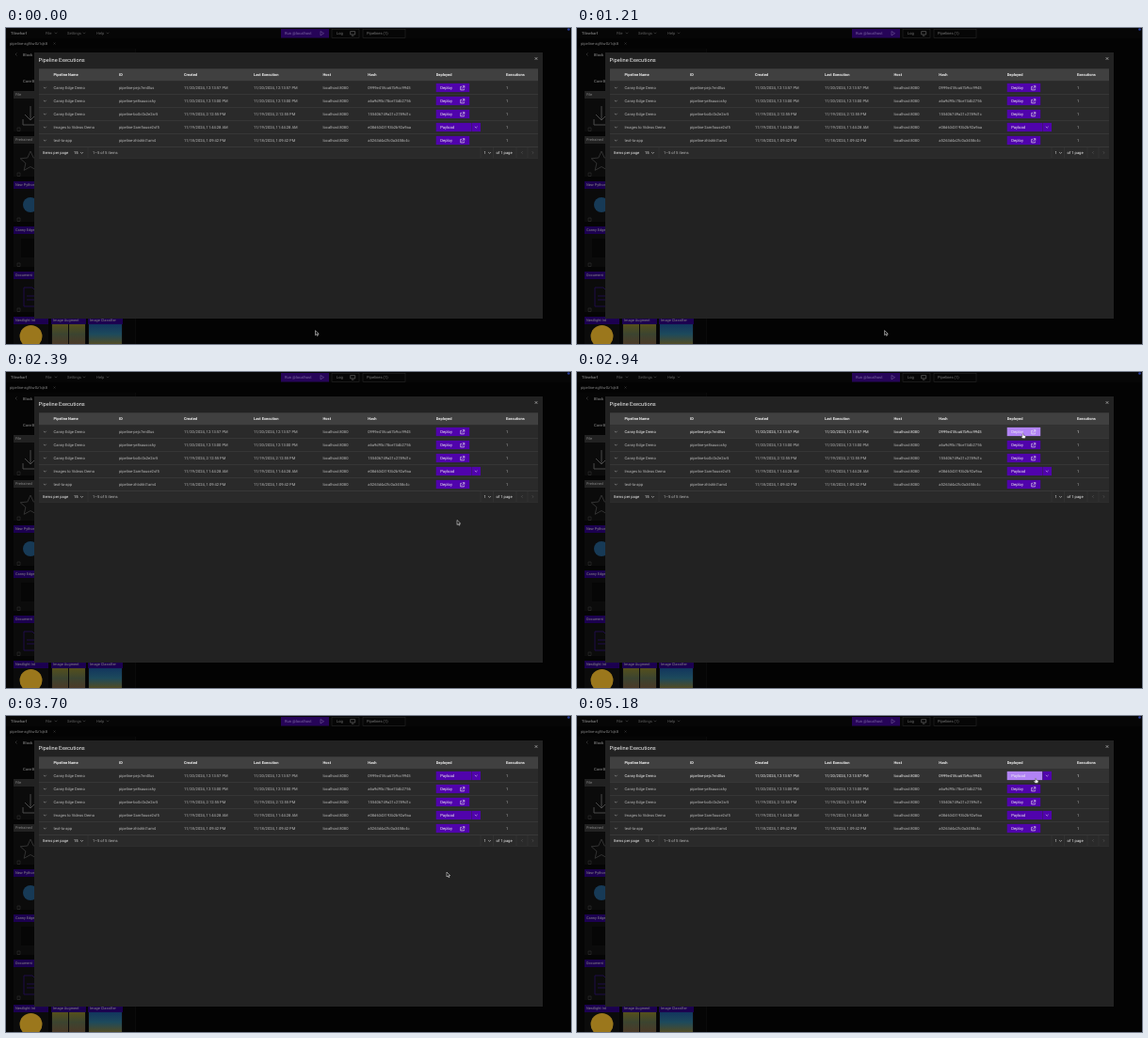
These frames come from a looping animation (600 by 336 pixels, 5210 ms). An HTML page:

```html
<!DOCTYPE html>
<html lang="en">
<head>
<meta charset="utf-8">
<title>Pipeline Executions</title>
<style>
html, body { margin: 0; width: 100%; height: 100%; overflow: hidden; background: #030303; }
svg { display: block; width: 600px; height: 336px; font: 4.1px Roboto, Inter, sans-serif; text-rendering: geometricPrecision; }
</style>
</head>
<body>
<svg id="stage" viewBox="0 0 600 336">
  <defs>
    <linearGradient id="sky" x2="0" y2="1">
      <stop stop-color="#12365e"/><stop offset=".5" stop-color="#1d4a5c"/><stop offset="1" stop-color="#514b25"/>
    </linearGradient>
    <linearGradient id="meadow" x2="0" y2="1">
      <stop stop-color="#55501c"/><stop offset=".5" stop-color="#3c4430"/><stop offset="1" stop-color="#4b3a28"/>
    </linearGradient>
  </defs>
</svg>
<script>
const stage = document.getElementById("stage");
const LOOP = 5210, DEPLOYED_AT = 3180, FADE = 110;
const WHITE = "#f0f0f0", DIM = "#b8b8b8";
const PURPLE = [80, 3, 172], LIGHT = [177, 131, 245];

function add(tag, attrs, parent = stage) {
  const node = document.createElementNS("http://www.w3.org/2000/svg", tag);
  for (const key in attrs) node.setAttribute(key, attrs[key]);
  return parent.appendChild(node);
}
const rect = (x, y, width, height, fill, parent) => add("rect", { x, y, width, height, fill }, parent);
const path = (d, stroke, width = 0.5, parent = stage) =>
  add("path", { d, stroke, "stroke-width": width, fill: "none" }, parent);
function text(x, y, content, fill = DIM, size = 4.1, weight = 400, parent = stage) {
  const node = add("text", { x, y, fill, "font-size": size, "font-weight": weight }, parent);
  node.textContent = content;
  return node;
}
const chevron = (x, y, color, parent) => path(`M${x - 1.4} ${y - 0.7}l1.4 1.4 1.4-1.4`, color, 0.5, parent);
const show = (node, on) => node.setAttribute("visibility", on ? "visible" : "hidden");

// Dimmed workspace behind the dialog
rect(0, 0, 600, 336, "#030303");
rect(0, 0, 600, 11, "#060606");
rect(0, 22, 137, 314, "#050505");
rect(137, 22, 0.6, 314, "#101010");
add("circle", { cx: 597.5, cy: 1.5, r: 1.3, fill: "#2b3fa0" });
text(5, 7, "Tilewharf", "#777", 4.1, 500);
[[42, "File"], [65, "Settings"], [96, "Help"]].forEach(([x, label], i) => {
  text(x, 7, label, "#606060");
  chevron(x + [11, 18, 12][i], 5.4, "#555");
});
rect(292, 1, 51, 9.5, "#260458");
text(296, 7.2, "Run @localhost", "#7d68a2");
path("M334 3.5v4.4l3.5-2.2z", "#7d68a2");
for (const [x, width] of [[346, 29], [379, 45]])
  add("rect", { x, y: 1.3, width, height: 9, fill: "none", stroke: "#2d2d2d", "stroke-width": 0.5 });
text(351, 7.2, "Log", "#777");
path("M365.7 3.7h5v3.2h-5zM367 8.2h2.4", "#888", 0.5);
text(383, 7.2, "Pipelines (1)", "#777");
text(4, 18.3, "pipeline-agf6w0z1qk8", "#808080");
path("M50.5 15.5l2 2m0-2l-2 2", "#555", 0.4);
path("M11.5 26.5l-1.5 1.5 1.5 1.5", "#666", 0.4);
text(18, 29.5, "Block", "#777", 4.1, 500);
text(18, 57.5, "Core B", "#777", 4.1, 500);

const blocks = [
  ["File", "#222"], ["Pretrained", "#222"], ["New Python", "#1c0050"],
  ["Canny Edge", "#1c0050"], ["Document", "#1c0050"], ["Nestlight Int", "#1c0050"]
];
function block(x, y, label, color) {
  rect(x, y, 37, 43, "#0b0b0b");
  rect(x, y, 37, 8, color);
  text(x + 2, y + 5.4, label, "#858585", 3.9);
  path(`M${x + 4} ${y + 39}h3v3.5h-3z`, "#444", 0.4);
}
blocks.forEach(([label, color], i) => block(8, 67 + i * 48, label, color));
block(48, 307, "Image Augment", "#1c0050");
block(87, 307, "Image Classifier", "#1c0050");
path("M26 83v15m-6-6l6 6 6-6M18 97v6h16v-6", "#4a4a4a", 1);
path("M26 131l3.2 7 7.6.8-5.7 5 1.7 7.5-6.8-3.8-6.8 3.8 1.7-7.5-5.7-5 7.6-.8z", "#3c3c3c", 0.8);
add("circle", { cx: 26, cy: 188, r: 8, fill: "#173a56" });
rect(16, 224, 18, 20, "#060606");
path("M19 276h9l5 5v15h-14zM22 285h8M22 289h8", "#1f0c48", 1);
add("circle", { cx: 26.5, cy: 328, r: 12, fill: "#9b771c" });
rect(49, 315, 17, 21, "url(#meadow)");
rect(67, 315, 17, 21, "url(#meadow)");
rect(88, 315, 35, 21, "url(#sky)");

// Dialog and table
rect(30, 26, 540, 283, "#222222");
text(34.6, 36.1, "Pipeline Executions", WHITE, 5.7);
path("M561.7 31.2l2.6 2.6m0-2.6l-2.6 2.6", WHITE, 0.5);
rect(35, 43.3, 530, 13.2, "#404040");
const columns = [50.5, 120, 189, 263, 336.5, 384.3];
["Pipeline Name", "ID", "Created", "Last Execution", "Host", "Hash"].forEach((label, i) =>
  text(columns[i], 51.1, label, WHITE, 4, 600));
text(456.7, 51.1, "Deployed", WHITE, 4, 600);
text(531, 51.1, "Executions", WHITE, 4, 600);

const records = [
  ["Canny Edge Demo", "pipeline-pejc7en0lus", "11/20/2024, 12:13:57 PM", "0999e418ca67b9cc9945"],
  ["Canny Edge Demo", "pipeline-ye8sauscshy", "11/20/2024, 12:13:00 PM", "a6a9d95c78ce74db2756"],
  ["Canny Edge Demo", "pipeline-bo0c0x2e2sr5", "11/19/2024, 2:12:55 PM", "155406749a21c2789d1c"],
  ["Images to Videos Demo", "pipeline-2amfiouse2sf5", "11/19/2024, 11:44:28 AM", "e08d6343193b2b92a9aa"],
  ["text-to-app", "pipeline-zhtshkt1am4", "11/18/2024, 1:09:42 PM", "a5263d4a2fc0a3458c4c"]
];

function makeRow([name, id, date, hash], i) {
  const y = 56.5 + i * 14, mid = y + 7;
  const back = rect(35, y, 530, 14, "#2a2a2a");
  rect(35, y + 13.5, 530, 0.6, "#575757");
  chevron(41.3, mid, DIM);
  const cells = [name, id, date, date, "localhost:8080", hash].map((value, c) => text(columns[c], mid + 1.5, value));
  cells.push(text(531, mid + 1.5, "1"));

  const deploy = add("g", {}), payload = add("g", {});
  const deployFill = rect(456.7, mid - 4.6, 35.5, 9.2, "", deploy);
  text(461.2, mid + 1.5, "Deploy", WHITE, 4.2, 400, deploy);
  path(`M484 ${mid - 1.2}h-1.3v3.6h3.7v-1.4M484.2 ${mid + 1}l2.6-2.8m-2 0h2v2`, WHITE, 0.6, deploy);
  const payloadFill = rect(456.7, mid - 4.6, 37.5, 9.2, "", payload);
  const menuFill = rect(494.5, mid - 4.6, 9.5, 9.2, "", payload);
  text(461.2, mid + 1.5, "Payload", WHITE, 4.2, 400, payload);
  chevron(499.2, mid, WHITE, payload);
  return { y, back, cells, deploy, payload, deployFill, payloadFill, menuFill };
}
const rows = records.map(makeRow);

rect(35, 126.6, 530, 11.8, "#2a2a2a");
path("M35 138.4H565M87 126.6v11.8M504 126.6v11.8M517.5 126.6v11.8M542 126.6v11.8M554 126.6v11.8", "#404040", 0.4);
text(39, 134, "Items per page", WHITE);
text(72, 134, "15", WHITE);
chevron(80.5, 132.7, WHITE);
text(92, 134, "1–5 of 5 items", DIM);
text(507.5, 134, "1", WHITE);
chevron(513.5, 132.7, WHITE);
text(520.5, 134, "of 1 page", WHITE);
path("M548.6 131.3l-1.2 1.2 1.2 1.2M558.8 131.3l1.2 1.2-1.2 1.2", "#777", 0.4);

const cursor = add("g", {});
const arrow = add("path", { d: "M0 0v5l1.2-1.1.8 1.8.9-.4-.8-1.7h1.6z", fill: "#111", stroke: "#fff", "stroke-width": 0.5 }, cursor);
const hand = add("path", {
  d: "M-.5.4Q0-.3.5.4V2l2 .5.4.6-.4 2.1H-.4L-1.9 3.5l.4-.5 1 .5z",
  fill: "#fff", stroke: "#222", "stroke-width": 0.35
}, cursor);

// Pointer tip: time, x, y
const track = [
  [0, 328.5, 321.7], [1200, 326.5, 321.7], [2000, 479, 157.5], [2420, 479, 157.5],
  [2800, 473.5, 65.2], [3240, 473.5, 65.2], [3640, 468, 166], [4000, 468, 166],
  [4520, 493.3, 101.7], [4860, 499, 64.5], [4960, 499, 64.5], [5090, 487, 66], [LOOP, 487, 66]
];

// Monotone cubic: stops at turns and rests, flows through points on the way
const slope = (k, axis) => (track[k + 1][axis] - track[k][axis]) / (track[k + 1][0] - track[k][0]);
function tangent(k, axis) {
  if (k === 0 || k === track.length - 1) return 0;
  const before = slope(k - 1, axis), after = slope(k, axis);
  return before * after > 0 ? 2 * before * after / (before + after) : 0;
}
function pointerAt(t) {
  const k = track.findIndex(point => point[0] > t) - 1;
  const [t0] = track[k], span = track[k + 1][0] - t0, u = (t - t0) / span;
  return [1, 2].map(axis => {
    const from = track[k][axis], to = track[k + 1][axis];
    return from + (to - from) * u * u * (3 - 2 * u)
      + span * u * (1 - u) * ((1 - u) * tangent(k, axis) - u * tangent(k + 1, axis));
  });
}

const isDeployed = (i, t) => i === 3 || (i === 0 && t >= DEPLOYED_AT);

// Which control of which row lies under the pointer
function targetAt(t) {
  const [x, y] = pointerAt(t);
  const i = rows.findIndex(row => Math.abs(y - row.y - 7) < 4.6);
  if (i < 0 || x < 456.7) return "";
  if (!isDeployed(i, t)) return x < 492.2 ? "main" + i : "";
  return x < 494.3 ? "main" + i : x < 504 ? "menu" + i : "";
}

function draw(t) {
  const [x, y] = pointerAt(t);
  const recent = Array.from({ length: 12 }, (_, k) => targetAt(Math.max(0, t - k * FADE / 12)));
  const fill = id => {
    const level = recent.filter(hit => hit === id).length / recent.length;
    return `rgb(${PURPLE.map((c, k) => c + (LIGHT[k] - c) * level)})`;
  };
  rows.forEach((row, i) => {
    const inRow = y >= row.y && y < row.y + 14;
    row.back.setAttribute("fill", inRow ? "#323232" : "#2a2a2a");
    row.cells.forEach(cell => cell.setAttribute("fill", inRow ? WHITE : DIM));
    show(row.deploy, !isDeployed(i, t));
    show(row.payload, isDeployed(i, t));
    row.deployFill.setAttribute("fill", fill("main" + i));
    row.payloadFill.setAttribute("fill", fill("main" + i));
    row.menuFill.setAttribute("fill", fill("menu" + i));
  });
  show(arrow, !recent[0]);
  show(hand, recent[0]);
  cursor.setAttribute("transform", `translate(${x} ${y})`);
}

const start = performance.now();
function tick() {
  draw((performance.now() - start) % LOOP);
  requestAnimationFrame(tick);
}
tick();
</script>
</body>
</html>
```
